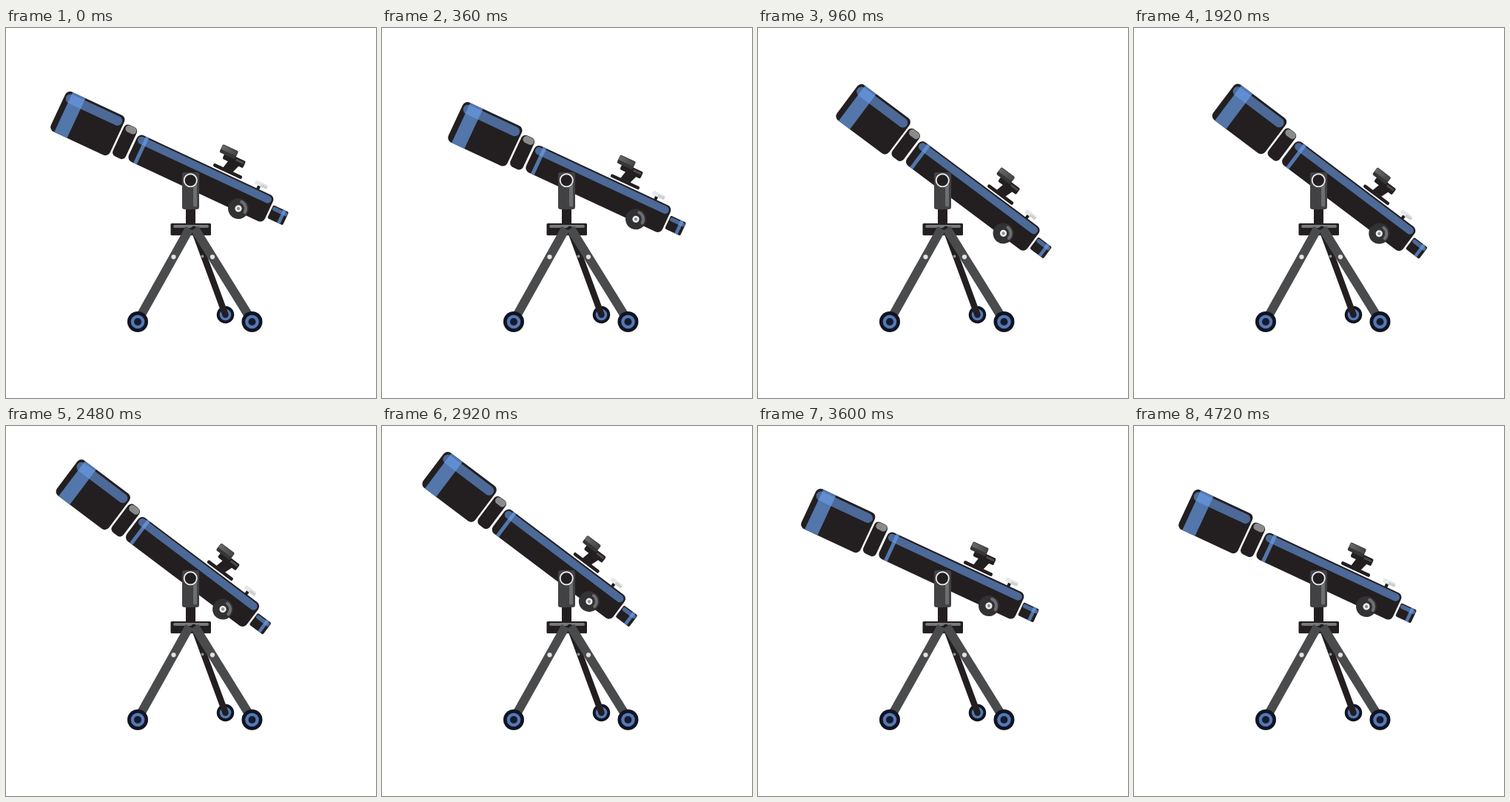
An HTML page for the animation above (4.8 s loop, 500 px wide and 500 px high).

```html
<!DOCTYPE html>
<html lang="en">
<head>
<meta charset="utf-8">
<title>Telescope</title>
<style>
  html, body { margin: 0; width: 100%; height: 100%; overflow: hidden; background: #fff; }
  svg { display: block; width: 100vw; height: 100vh; }
  .dark { fill: #231f20; }
  .grey { fill: #6d6e70; }
  .leg { stroke: #4a4b4d; stroke-width: 12; }
  .band { fill: #6a9fee; fill-opacity: .58; }
  .stripe { fill: #6a9fee; fill-opacity: .68; }
</style>
</head>
<body>
<svg viewBox="0 0 500 500">
  <defs>
    <linearGradient id="metal">
      <stop offset="0" stop-color="#68696b"/>
      <stop offset="1" stop-color="#454446"/>
    </linearGradient>
    <clipPath id="hoodClip"><rect x="-202" y="-40.5" width="88" height="59.5" rx="7"/></clipPath>
    <g id="wheel">
      <circle r="14" fill="#111421"/>
      <circle r="9.3" fill="#5577b5"/>
      <circle r="5" fill="#151a2b"/>
    </g>
  </defs>

  <!-- stand -->
  <rect class="dark" x="243" y="240" width="13" height="28"/>
  <rect class="dark" x="222.5" y="264" width="54.5" height="16.3" rx="1.5"/>
  <rect x="226" y="266" width="48" height="4" rx="2" fill="#77787a"/>
  <use href="#wheel" transform="translate(296.5 387.5) scale(.84)"/>
  <path d="M254 272L296 386" stroke="#231f20" stroke-width="8.5" stroke-linecap="round"/>
  <circle cx="265.5" cy="308.5" r="2" fill="#8a8a8c"/>
  <path class="leg" d="M248 271L178 396"/>
  <path class="leg" d="M255 271L332.5 396"/>
  <circle cx="226.5" cy="309.3" r="3.1" fill="#e1e2e3"/>
  <circle cx="279" cy="309.3" r="3.1" fill="#e1e2e3"/>
  <use href="#wheel" x="178" y="397"/>
  <use href="#wheel" x="332.5" y="397"/>

  <!-- tube, drawn along its own axis around the pivot -->
  <g id="tube">
    <rect class="dark" x="-202" y="-40.5" width="88" height="59.5" rx="7"/>
    <rect class="band" x="-199.5" y="-37.5" width="83" height="13" rx="6.5"/>
    <rect class="stripe" x="-194" y="-41" width="19" height="61" clip-path="url(#hoodClip)"/>

    <rect class="dark" x="-111.5" y="-33" width="19" height="47" rx="6"/>
    <rect x="-109" y="-32.5" width="15.5" height="9.5" rx="4.7" fill="#8b8b8c"/>

    <rect class="dark" x="85.7" y="-33" width="4.2" height="8"/>
    <rect x="80.5" y="-38" width="18" height="6" rx="2" fill="#e8e9ea"/>
    <path d="M88 -32h8.500a2 2 0 0 0 2 -2v-2h-9z" fill="#cfd0d2"/>

    <rect class="dark" x="-89.500" y="-28" width="203" height="39.5" rx="7"/>
    <rect class="band" x="-87.5" y="-26" width="198.5" height="10.500" rx="5.2"/>
    <rect class="stripe" x="-79.5" y="-28" width="5" height="39.5"/>

    <rect class="dark" x="116" y="-17" width="23" height="19.5" rx="2"/>
    <rect class="band" x="117" y="-15.5" width="21.500" height="5.5" rx="2.5"/>
    <rect class="stripe" x="130.500" y="-17" width="4.6" height="19.5"/>

    <rect class="dark" x="19.5" y="-34.5" width="42.5" height="4.6" rx="2"/>
    <path class="dark" d="M36 -47H52L47.500 -34H33z"/>
    <rect class="dark" x="27" y="-54.5" width="30.500" height="10" rx="2"/>
    <rect x="44" y="-52.500" width="12" height="3" rx="1.5" fill="#4a494b"/>
    <rect x="19.5" y="-62.8" width="23.2" height="12" rx="2" fill="#363537"/>
    <rect x="20" y="-62" width="22" height="6.5" rx="1.5" fill="url(#metal)"/>

    <g transform="translate(75.2 7.4)">
      <circle r="14" fill="#323133"/>
      <path d="M0 -10A10 10 0 0 1 10 1" fill="none" stroke="#6d6e70" stroke-width="4" stroke-linecap="round"/>
      <circle r="4.6" fill="#eeeff0"/>
      <circle r="2.1" fill="#8d8e90"/>
    </g>
  </g>

  <!-- bracket -->
  <rect x="238" y="195" width="23" height="50" rx="3" fill="#424244"/>
  <rect class="grey" x="253" y="207" width="5" height="34.5" rx="2.5"/>
  <circle cx="249.3" cy="205.8" r="8.6" fill="#231f20" stroke="#e6e7e8" stroke-width="1.9"/>
</svg>
<script>
  const LOOP = 4800, STEP = 40, AXIS = 25, SLIDE = 26.3 * Math.PI / 180;

  // [start, end, from, to, power of the ease-out]
  const slides = [[0, 600, 0, 34, 3.3], [2120, 3120, 34, -32, 3], [3160, 4120, -32, 0, 4.3]];
  const turns = [[600, 1120, 0, 12, 3.4], [3120, 3520, 12, 0, 3.5]];

  function valueAt(moves, t) {
    let value = moves[0][2];
    for (const [start, end, from, to, power] of moves) {
      if (t < start) break;
      const left = Math.max(0, 1 - (t - start) / (end - start));
      value = to + (from - to) * left ** power;
    }
    return value;
  }

  const tube = document.getElementById('tube');
  const began = performance.now();

  function draw(now) {
    const t = Math.floor(Math.max(0, now - began) % LOOP / STEP) * STEP;
    const d = valueAt(slides, t);
    const x = d * Math.cos(SLIDE), y = d * Math.sin(SLIDE);
    tube.setAttribute('transform',
      `translate(249 205.5) rotate(${valueAt(turns, t)}) translate(${x} ${y}) rotate(${AXIS})`);
    requestAnimationFrame(draw);
  }
  draw(began);
</script>
</body>
</html>
```
